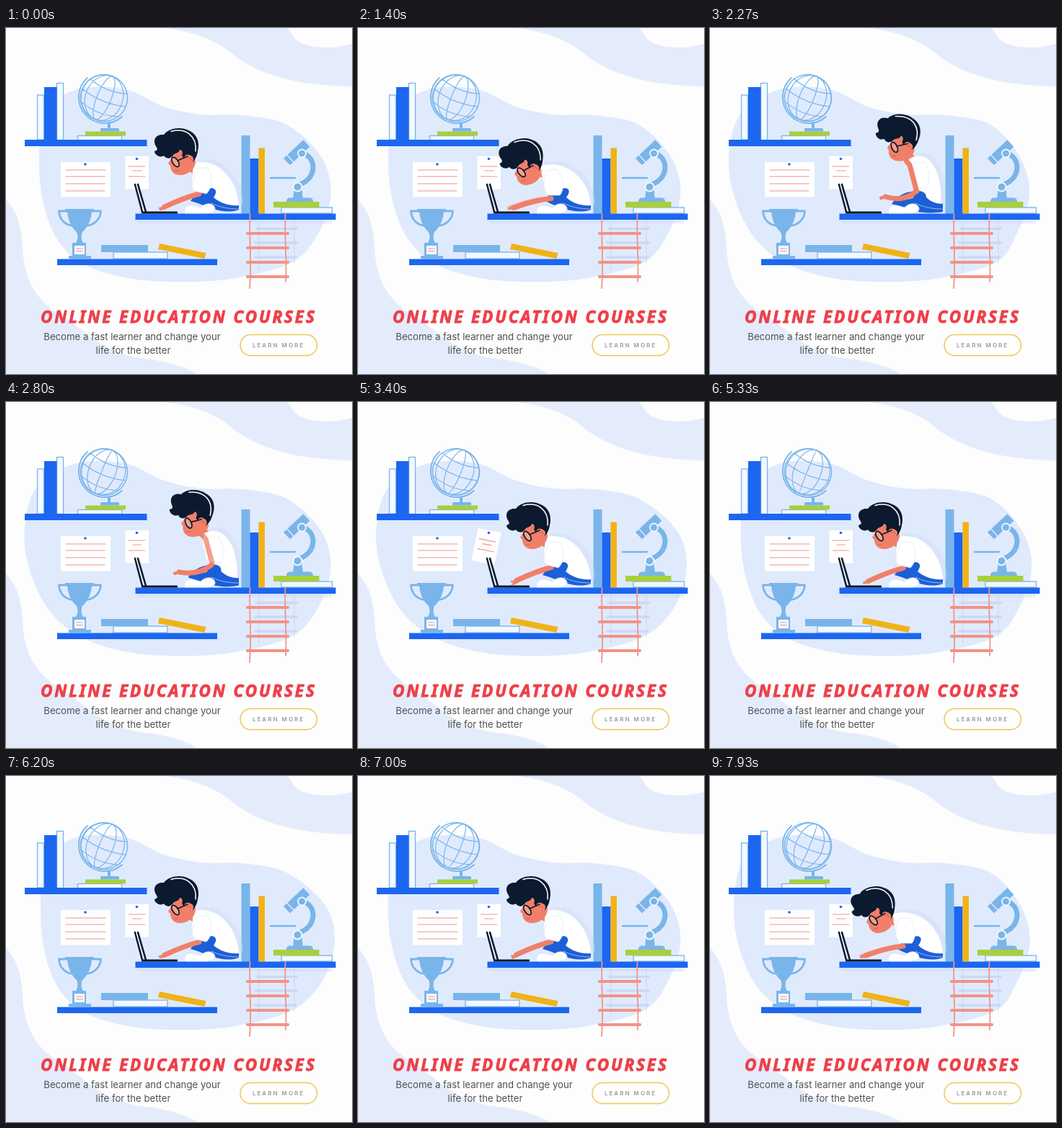
Write an HTML page that moves like this. It is 480x480 px and loops after 8000 ms.

```html
<!DOCTYPE html>
<html lang="en">
<head>
<meta charset="utf-8">
<title>Online education courses</title>
<style>
  html, body { margin: 0; width: 100%; height: 100%; overflow: hidden; background: #fdfdfd; }
  svg { display: block; width: 100%; height: 100%; }
  .band { fill: #e4ecfc; }
  .blue { fill: #1c66f0; }
  .sky { fill: #79b5ea; }
  .green { fill: #a9cf3a; }
  .gold { fill: #efb318; }
  .skin { fill: #f17f69; }
  .ink { fill: #0b1a2e; }
  .white { fill: #fff; }
  .outline { fill: #f3f8ff; stroke: #79b5ea; stroke-width: 1.3; }
  .line { fill: none; stroke-linecap: round; stroke-linejoin: round; }
  .skyline { stroke: #79b5ea; }
  .coral { stroke: #f2938a; }
  .inkline { stroke: #0b1a2e; }
  .skinline { stroke: #f17f69; }
  #title { font: italic 900 20px "Noto Sans", "Open Sans", sans-serif; font-stretch: extra-condensed;
           letter-spacing: .13em; fill: #ee3f49; stroke: #ee3f49; stroke-width: .9; }
  .copy { font: 400 13.2px Inter, "Open Sans", sans-serif; fill: #505050; text-anchor: middle; }
  .button { font: 600 8px Inter, "Open Sans", sans-serif; letter-spacing: 2px; fill: #999; }
</style>
</head>
<body>
<svg viewBox="0 0 480 480">
  <!-- backdrop -->
  <path class="band" d="M220 0C261 5 292 17 315 37C352 66 406 80 480 81V22C450 31 416 27 403 17C397 12 397 5 390 0Z"/>
  <path class="band" d="M0 238C16 256 22 276 23 305C25 350 42 378 76 398C116 424 130 446 180 457C218 461 246 468 265 480H0Z"/>
  <path id="blob" fill="#e0eafd"/>

  <!-- upper shelf -->
  <g>
    <rect class="outline" x="43.5" y="93" width="9" height="62"/>
    <rect class="outline" x="70.5" y="76.5" width="9" height="79"/>
    <rect class="blue" x="53" y="82" width="17.5" height="73"/>
    <rect class="outline" x="99.5" y="149.5" width="61" height="6"/>
    <rect class="green" x="110" y="143.5" width="56" height="6"/>
    <path class="sky" d="M131 143.5V140Q131 139 133 139H155Q157 139 157 140V143.5ZM141 131H145V140H141Z"/>
    <path class="line skyline" stroke-width="1.8" d="M113 69A36 36 0 1 0 161 123"/>
    <g transform="translate(136 97) rotate(22)">
      <circle class="line skyline" r="32.5" stroke-width="1.5"/>
      <path id="globe" class="line skyline" stroke-width="1.2"/>
    </g>
    <rect class="blue" x="26" y="155" width="169.5" height="9"/>
  </g>

  <!-- notes -->
  <g>
    <rect class="white" x="76" y="186" width="69" height="48.5"/>
    <path class="line coral" stroke-width="1.2" d="M83 197H138M83 206H137M83 216H138M83 226H137"/>
    <circle class="blue" cx="110" cy="189" r="1.8"/>
  </g>
  <g id="note">
    <rect class="white" x="165.5" y="178" width="32.5" height="45.5"/>
    <path class="line coral" stroke-width="1.2" d="M170 192H193M176 198H188M170 206H193"/>
    <circle class="blue" cx="181.5" cy="181.5" r="1.8"/>
  </g>

  <!-- lower shelf -->
  <g>
    <path class="line skyline" stroke-width="2.8" d="M86 254H73.5C74 266 82 273 93 274.500M118 254H131.500C131 266 122 273 111 274.500"/>
    <path class="sky" d="M82 251H122V255H119C118 268 112 278 106 283C104 288 104 293 107 298H111V316H118V320H87V316H92V298H97C100 293 100 288 98 283C92 278 86 268 85 255H82Z"/>
    <rect fill="#f7faff" x="95" y="302" width="14" height="12"/>
    <path class="line coral" stroke-width="1" d="M97.500 306H106.500M97.500 309.500H106.500"/>
    <rect class="outline" x="149" y="311" width="75" height="9"/>
    <rect class="sky" x="132" y="301" width="65" height="10"/>
    <path class="gold" d="M213 299L277.500 312L275.500 320L211 307Z"/>
    <rect class="blue" x="71" y="320.500" width="222" height="8.500"/>
  </g>

  <!-- ladder and its shadow -->
  <path class="line" stroke="#cbd9f6" stroke-width="3.5" d="M348 278.500H403M346 298H403M346 318H402"/>
  <path class="line" stroke="#cbd9f6" stroke-width="1.3" d="M351 266V335M400 266V325"/>
  <rect x="182" y="266" width="270" height="5" fill="#c9d8f8" opacity=".45"/>

  <!-- right shelf -->
  <g>
    <rect class="sky" x="326.500" y="149" width="12" height="109"/>
    <rect class="blue" x="338.500" y="181" width="12" height="77"/>
    <rect class="gold" x="350.500" y="166.500" width="8.500" height="91"/>
    <rect class="outline" x="382" y="249" width="70.500" height="8"/>
    <rect class="green" x="371" y="241" width="63.500" height="8"/>
    <path class="sky" d="M389 241Q389 235.500 394 235.500H421Q426 235.500 426 241Z"/>
    <path class="sky" d="M400 220H410L412 237H398Z"/>
    <path class="line skyline" stroke-width="7" d="M415 175C432 184 429 209 408 217"/>
    <path class="line skyline" stroke-width="2.500" d="M367 208H401"/>
    <g transform="rotate(47 403 173)">
      <rect class="sky" x="396.500" y="154" width="13" height="30"/>
      <rect class="sky" x="396.500" y="185.500" width="13" height="6"/>
    </g>
    <circle cx="410.500" cy="174" r="5.500" fill="#79b5ea" stroke="#f3f8ff" stroke-width="1.800"/>
    <circle cx="404.500" cy="220.500" r="6" fill="#79b5ea" stroke="#f3f8ff" stroke-width="2"/>
    <rect class="blue" x="179.500" y="257.500" width="278" height="8.500"/>
  </g>
  <path class="line coral" stroke-width="1.800" d="M338.500 258C337 290 341 325 338 361M387.500 258C386 290 390 320 388 352"/>
  <path class="line coral" stroke-width="4.200" d="M335 285H391M335 305H391M335 325H391M335 345H391"/>

  <!-- student -->
  <path id="shade" fill="#ccd9f5" opacity=".4" transform="translate(6 -4)"/>
  <path id="neck" class="line skinline" stroke-width="13"/>
  <path id="shirt" class="white"/>
  <path id="legs" fill="#1c5fd6"/>
  <path class="line" stroke="#8fb5f7" stroke-width="1" d="M285 243C296 249 310 251 322 251"/>
  <path fill="#fff" stroke="#d4ddf0" stroke-width=".8" d="M248 257C246 250 251 245 259 246L270 249C278 241 288 243 290 250C291 255 284 257 276 257Z"/>
  <path id="farArm" class="line" stroke="#f6a08c" stroke-width="5"/>
  <path id="arm" class="line skinline" stroke-width="7"/>
  <path id="fingers" class="line skinline" stroke-width="2.5"/>
  <path id="sleeve" fill="#fff" stroke="#e1e7f4" stroke-width=".8"/>
  <g id="head">
    <path class="skin" d="M232 170C230 178 229 182 226 186C224 189 227 190 228 191C228 199 234 205 243 204C253 203 261 197 263 187L261 168Z"/>
    <path class="ink" d="M208 164C203 155 208 147 219 148C226 138 244 137 253 142C266 147 269 160 266 171C265 178 262 183 259 186L257 178C252 173 248 176 247 181L244 177C246 172 244 169 241 169C240 174 235 173 232 176C228 183 221 181 219 177C214 181 206 176 206 171C210 170 211 168 208 164Z"/>
    <path class="line" stroke="#fff" stroke-width="1.5" d="M229 143.5C250 138 265 150 263 171"/>
    <circle class="skin" cx="254.500" cy="182" r="5.500"/>
    <path class="line" stroke="#d55e50" stroke-width="1" d="M252 182Q255 178 257 183M234 198Q237 199 239 197"/>
    <ellipse cx="235" cy="186" rx="3.800" ry="7.500" fill="#fbd5cb" fill-opacity=".4" stroke="#0b1a2e" stroke-width="1.7" transform="rotate(-35 235 186)"/>
    <path class="line inkline" stroke-width="1.7" d="M238 184L252 178"/>
  </g>
  <path id="chinArm" class="line skinline" stroke-width="7" d="M272 184L277 190L286 224"/>

  <!-- laptop -->
  <path class="line inkline" stroke-width="2.6" d="M179 217L189 255M183 217L194 255"/>
  <path class="line" stroke="#fff" stroke-width=".8" d="M181 218L191 254"/>
  <rect class="ink" x="188" y="254.500" width="50" height="3" rx="1"/>

  <!-- copy -->
  <text id="title" x="48">ONLINE EDUCATION COURSES</text>
  <text class="copy" x="175" y="432.500">Become a fast learner and change your</text>
  <text class="copy" x="176.500" y="451.500">life for the better</text>
  <rect x="325" y="425.500" width="106.500" height="29" rx="14.500" fill="#fff" stroke="#efc653" stroke-width="1.500"/>
  <text class="button" x="342" y="443">LEARN MORE</text>
</svg>
<script>
const DURATION = 8000;
const el = id => document.getElementById(id);
const draw = (id, d) => el(id).setAttribute('d', d);
const place = (id, transform) => el(id).setAttribute('transform', transform);
const NUMBER = /-?\d+(\.\d+)?/g;

// Each part: leaning on the desk, working, sitting upright.
const poses = {
  shirt: ['M252 192C288 180 322 210 323 248L286 252C272 244 264 228 257 212Z',
          'M260 188C290 178 322 208 323 248L286 252C272 240 262 222 258 210Z',
          'M276 182C300 166 325 194 320 250L288 254C284 238 284 222 275 196Z'],
  neck: ['M248 194L258 202', 'M254 190L264 198', 'M275 178L282 186'],
  legs: ['M260 240C264 230 272 224 288 222C296 224 292 231 289 235C298 244 312 247 323 246V252C304 259 284 250 268 244Z',
         'M256 240C262 230 270 224 286 222C294 224 291 231 288 235C298 244 312 247 323 246V252C304 259 284 250 266 243Z',
         'M252 244C260 232 272 226 290 226C299 227 300 232 300 235C306 241 314 244 323 244V255C300 259 278 254 264 248Z'],
  sleeve: ['M262 198C256 212 256 224 264 232L280 232C288 222 284 206 276 196Z',
           'M266 194C260 208 254 220 262 226L278 230C288 220 286 204 280 194Z',
           'M284 186C280 200 283 214 288 222L300 222C306 210 304 196 298 186Z'],
  arm: ['M268 236Q246 238 216 249', 'M268 230Q248 235 220 248', 'M287 226Q268 242 243 234'],
  farArm: ['M250 238Q230 242 210 250', 'M256 234Q236 240 217 250', 'M280 234Q262 239 246 235']
};

function mix(from, to, k) {
  const goal = to.match(NUMBER);
  let i = 0;
  return from.replace(NUMBER, v => (+v + (goal[i++] - v) * k).toFixed(2));
}

// Smooth interpolation through [time, value] stops.
function track(stops, t) {
  const next = stops.findIndex(s => s[0] > t);
  if (next < 0) return stops.at(-1)[1];
  const [t0, a] = stops[next - 1], [t1, b] = stops[next];
  const u = (t - t0) / (t1 - t0);
  return a + (b - a) * u * u * (3 - 2 * u);
}

// 1 is leaning on the desk, 0 working, -1 upright.
const leanStops = [[0, 0], [600, 0], [1050, 1], [1500, 1], [1950, -1], [2700, -1], [3150, 0],
                   [4050, 0], [4450, .16], [5000, 0], [7130, 0], [7580, 1], [8000, 1]];
const leftStops = [[0, 46], [1400, 42], [2270, 26], [3400, 25], [4470, 38], [6200, 48], [8000, 33]];

function closedCurve(points) {
  const n = points.length, at = i => points[(i + n) % n];
  return points.reduce((d, p, i) => {
    const q = at(i + 1), before = at(i - 1), after = at(i + 2);
    const c = [0, 1].map(k => p[k] + (q[k] - before[k]) / 6);
    const e = [0, 1].map(k => q[k] - (after[k] - p[k]) / 6);
    return `${d}C${c} ${e} ${q}`;
  }, `M${points[0]}`) + 'Z';
}

function drawBlob(t) {
  const left = track(leftStops, t);
  const right = 449 + 7 * Math.cos((t - 600) / 2800 * 2 * Math.PI);
  draw('blob', closedCurve([
    [left, 178], [left * .5 + 30, 118], [98, 85], [165, 85], [219, 109], [272, 120], [328, 121],
    [389, 134], [right - 14, 178], [right, 230], [right - 18, 286], [395, 326], [312, 348],
    [236, 352], [170, 347], [108, 328], [left * .4 + 52, 292], [left * .8 + 14, 238]
  ]));
}

function drawGlobe(t) {
  const R = 32;
  let d = '';
  for (const y of [-17, 0, 17]) {
    const x = Math.sqrt(R * R - y * y);
    d += `M${-x} ${y}Q0 ${y + 9} ${x} ${y}`;
  }
  const turn = t * .03 % 36;
  for (let angle = turn - 90; angle < 90; angle += 36) {
    const rx = R * Math.sin(angle * Math.PI / 180);
    d += `M0 ${-R}A${Math.abs(rx)} ${R} 0 0 ${rx > 0 ? 1 : 0} 0 ${R}`;
  }
  draw('globe', d);
}

function drawStudent(t) {
  const lean = track(leanStops, t), low = Math.max(lean, 0), up = Math.max(-lean, 0);
  for (const [id, [desk, work, upright]] of Object.entries(poses))
    draw(id, lean > 0 ? mix(work, desk, low) : mix(work, upright, up));
  draw('shade', el('shirt').getAttribute('d'));

  place('head', `translate(${-8 * low + 20 * up} ${13 * low - 18 * up}) rotate(${-5 * low + 10 * up} 250 190)`);
  el('chinArm').style.opacity = Math.max(0, up * 2 - 1);

  const tap = Math.sin(t / 70) * (1 - up);
  place('arm', `translate(0 ${tap * .5})`);
  place('farArm', `translate(0 ${-tap * .7})`);
  const x = 220 - 4 * low + 23 * up, y = 249 - 15 * up;
  draw('fingers', `M${x} ${y}L${x - 7} ${y + 1 + tap}M${x} ${y + 1}L${x - 6} ${y + 3 - tap}`);
}

function drawNote(t) {
  const s = (t - 2900) / 1000;
  const angle = s > 0 && s < 1.4 ? 14 * Math.sin(s * Math.PI) * (1 - s / 1.4) ** .5 : 0;
  place('note', `rotate(${angle} 181.5 181.5)`);
}

// The heading takes the size at which its line is 383 units long.
const title = el('title');
const titleSize = 20 * 383 / title.getComputedTextLength();
title.style.fontSize = titleSize + 'px';
title.setAttribute('y', 400.5 + titleSize * .357);

function frame() {
  const t = performance.now() % DURATION;
  drawBlob(t);
  drawGlobe(t);
  drawNote(t);
  drawStudent(t);
  requestAnimationFrame(frame);
}
frame();
</script>
</body>
</html>
```
